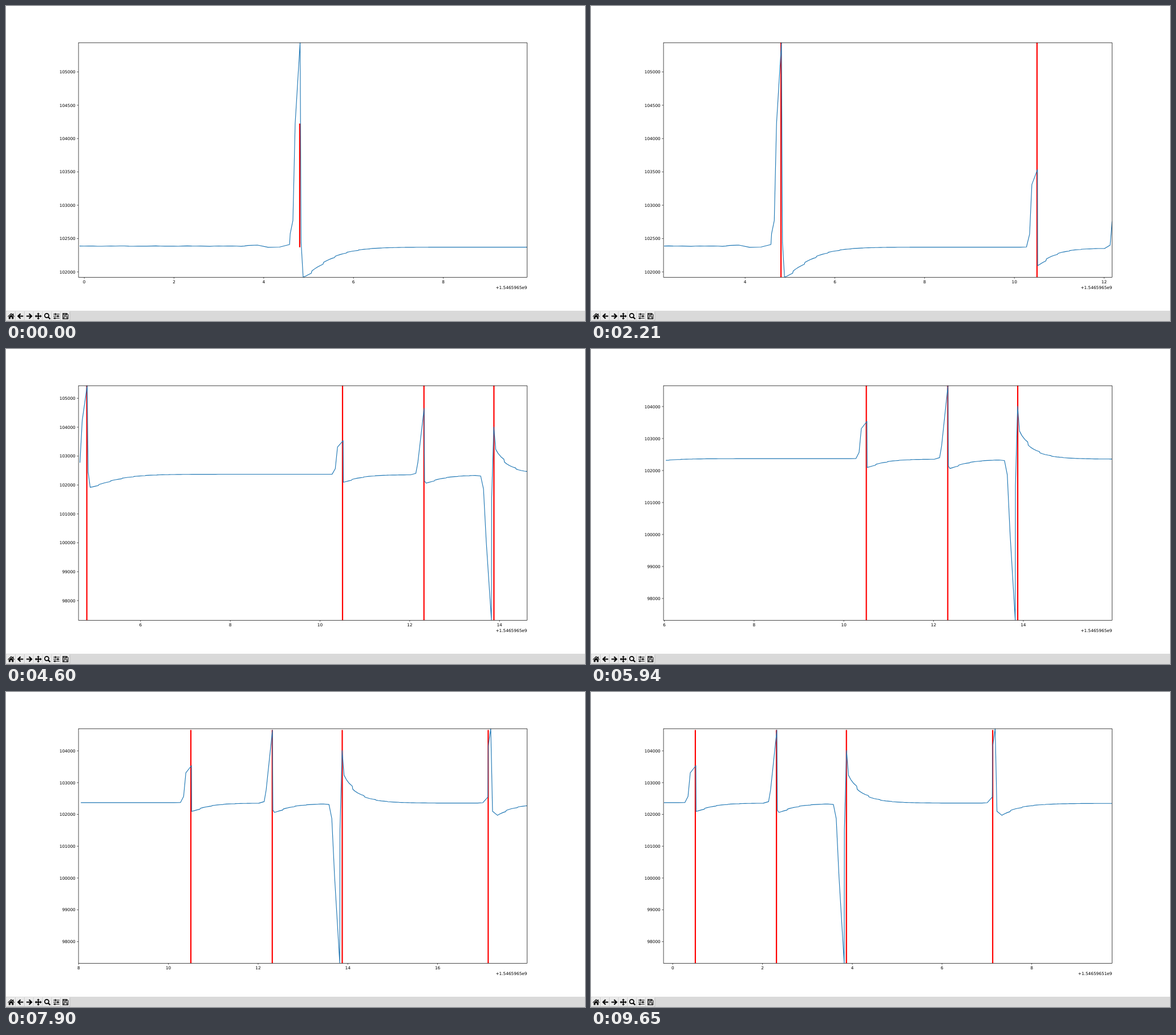
Write an HTML page that moves like this. It is 1015 px wide and 552 px high and loops after 9810 ms.

```html
<!DOCTYPE html>
<html lang="en">
<head>
<meta charset="utf-8">
<title>Pressure plot</title>
<style>
  html, body { margin: 0; width: 100%; height: 100%; overflow: hidden; background: #fff; }
  svg { display: block; width: 1015px; height: 552px; }
  text { font: 7.35px "DejaVu Sans", sans-serif; text-rendering: geometricPrecision; }
</style>
</head>
<body>
<svg viewBox="0 0 1015 552">
  <defs>
    <clipPath id="area"><rect x="126.9" y="64.1" width="786.6" height="411.2"/></clipPath>
  </defs>
  <rect width="1015" height="552" fill="#fff"/>
  <g clip-path="url(#area)" fill="none">
    <path id="marks" stroke="#f00" stroke-width="2.2"/>
    <path id="curve" stroke="#1f77b4" stroke-width="1.15" stroke-linejoin="round"/>
  </g>
  <path id="ticks" stroke="#000" stroke-width=".65"/>
  <rect x="127.1" y="64.3" width="786.5" height="411.1" fill="none" stroke="#000" stroke-width=".7"/>
  <g id="labels"></g>
  <text id="offset" x="913.5" y="495.8" text-anchor="end"></text>

  <rect y="534" width="1015" height="18" fill="#d9d9d9"/>
  <g id="buttons"></g>
  <g fill="#000">
    <path transform="translate(9 543.5)" d="M0-5.2 2.7-2.7V-4.4H4.2V-1.3L6 .4 5.3 1.2 0-3.6-5.3 1.2-6 .4ZM0-2.6 4.2 1.2V5H1.2V1.8H-1.2V5H-4.2V1.2Z"/>
    <path id="arrow" transform="translate(25 543.5)" d="M-5.4 0-.3-5.1 1.2-3.6-1.4-1.1H5.2V1.1H-1.4L1.2 3.6-.3 5.1Z"/>
    <use href="#arrow" transform="translate(66 0) scale(-1 1)"/>
    <path transform="translate(56.6 543.5)" d="M0-6 2.4-3.4H.9V-.9H3.4V-2.4L6 0 3.4 2.4V.9H.9V3.4H2.4L0 6-2.4 3.4H-.9V.9H-3.4V2.4L-6 0-3.4-2.4V-.9H-.9V-3.4H-2.4Z"/>
  </g>
  <g transform="translate(72.4 543.5)" fill="none" stroke="#000" stroke-width="1.7">
    <circle cx="-1" cy="-1" r="3.6"/>
    <path d="M1.7 1.7 5 5" stroke-width="2.2"/>
  </g>
  <g transform="translate(88.4 543.5)" stroke="#000">
    <path d="M-5.4-3.5H5.4M-5.4 0H5.4M-5.4 3.5H5.4"/>
    <path d="M-1.8-4.9V-2.1M2.6-1.4V1.4M-2.8 2.1V4.9" stroke-width="2"/>
  </g>
  <g transform="translate(104.2 543.5)" fill="none" stroke="#000" stroke-width="1.1">
    <path d="M-4.6-4.6H2.6L4.6-2.6V4.6H-4.6ZM-2.7 4.4V1H2.7V4.4M-2.7-4.4V-1.6H1.8V-4.4"/>
    <path d="M.8-4.2V-2" stroke-width="1.4"/>
  </g>
</svg>
<script>
const LOOP = 9810, SPAN = 10, END = 20;
const L = 126.9, R = 913.5, T = 64.1, B = 475.3, ZERO = 102000;
const DOT = 1015 / 1920; // one plot pixel on this stage
const $ = id => document.getElementById(id);

// Stretches of even redraws: start in ms, number of redraws.
const pace = [[0, 3], [630, 2], [1180, 8], [3240, 5], [4350, 1], [4600, 4], [5580, 1],
  [5940, 1], [6250, 3], [6950, 1], [7150, 3], [7900, 7], [9650, 1]];

// Elapsed ms against the newest sample time in seconds.
const clock = [[0, 9.869], [1180, 11.135], [3240, 13.222], [4600, 14.615],
  [6950, 17.007], [7900, 17.995], [9650, 19.791]];

// Pressure beats: marker time, key points of the spike, then a decay to base.
const beats = [
  { at: 4.802, base: 371, tau: .62, pow: 1.25, spike: [
    [3.57, 388], [3.65, 397], [3.86, 402], [4.1, 369], [4.35, 372], [4.575, 411],
    [4.59, 575], [4.65, 772], [4.7, 2225], [4.81, 3440], [4.833, 437], [4.878, -80]] },
  { at: 10.504, base: 355, tau: .38, pow: 1.1, spike: [
    [10.27, 374], [10.34, 565], [10.39, 1310], [10.515, 1535], [10.52, 94]] },
  { at: 12.314, base: 340, tau: .38, pow: 1.1, spike: [
    [12.135, 402], [12.18, 772], [12.32, 2655], [12.33, 137], [12.365, 64]] },
  { at: 13.873, base: 356, tau: .29, pow: .9, spike: [
    [13.58, 312], [13.643, -133], [13.705, -1970], [13.82, -4680], [13.825, -470],
    [13.873, 2010], [13.916, 1232]] },
  { at: 17.128, base: 348, tau: .38, pow: .95, spike: [
    [17.007, 368], [17.12, 545], [17.13, 2150], [17.185, 2700], [17.225, 100], [17.335, -28]] }
];

const lerp = (a, b, k) => a + (b - a) * k;

const steps = pace.flatMap(([from, n], i) => {
  const to = i + 1 < pace.length ? pace[i + 1][0] : LOOP;
  return Array.from({ length: n }, (_, k) => lerp(from, to, k / n));
});

// Decay after a spike; readings lag more and more until each block arrives.
function decay({ spike, base, tau, pow }, end) {
  const [x0, y0] = spike[spike.length - 1], block = .26, out = [];
  for (let k = 0; k * block < end - x0; k++) {
    for (const p of [0, .2, .45, .7, .95]) {
      const u = (k + p) * block - .065;
      if (u < .02 || x0 + u > end - .08) continue;
      const lagged = Math.max(0, u - .055 * p * p);
      out.push([x0 + u, base + (y0 - base) * Math.exp(-((lagged / tau) ** pow))]);
    }
  }
  return out;
}

const samples = [];
for (let x = -.105; x < 3.5; x += .1) samples.push([x, 387 + 3 * Math.sin(x * 13) * Math.sin(x * 5)]);
beats.forEach((b, i) => {
  const end = i + 1 < beats.length ? beats[i + 1].spike[0][0] : END;
  samples.push(...b.spike, ...decay(b, end));
});

function along(points, x) {
  let i = 1;
  while (i < points.length - 1 && points[i][0] < x) i++;
  const [a, b] = [points[i - 1], points[i]];
  return lerp(a[1], b[1], (x - a[0]) / (b[0] - a[0]));
}

const between = (from, to) => samples.filter(p => p[0] >= from && p[0] < to);

function range(points) {
  const values = points.map(p => p[1]);
  return [Math.min(...values), Math.max(...values)];
}

function tickStep(size) {
  const raw = size / 9, mag = 10 ** Math.floor(Math.log10(raw));
  return mag * [1, 2, 2.5, 5, 10].find(s => s * mag >= raw);
}

const snap = v => (Math.round(v / DOT) * DOT).toFixed(2);
const label = (x, y, anchor, s) =>
  `<text x="${x.toFixed(2)}" y="${y.toFixed(2)}" text-anchor="${anchor}">${s}</text>`;

function draw(ms) {
  const right = along(clock, ms), left = right - SPAN;
  const view = [...between(left, right), [right, along(samples, right)]];
  const [min, max] = range(view);
  const px = x => L + (x - left) / SPAN * (R - L);
  const py = v => B - (v - min) / (max - min) * (B - T);

  $("curve").setAttribute("d", "M" + view.map(p =>
    px(p[0]).toFixed(2) + " " + py(p[1]).toFixed(2)).join("L"));

  // All markers span the data range known when the latest beat was detected.
  const seen = beats.filter(b => b.at <= right);
  const last = seen[seen.length - 1].at;
  const [low, high] = range(between(last - SPAN, last));
  $("marks").setAttribute("d", seen.filter(b => b.at >= left).map(b =>
    `M${snap(px(b.at))} ${py(low).toFixed(2)}V${py(high).toFixed(2)}`).join(""));

  let ticks = "", text = "";
  const first = Math.ceil(left / 2) * 2, base = first >= 10 ? 10 : 0;
  for (let x = first; x <= right; x += 2) {
    ticks += `M${px(x).toFixed(2)} ${B}v2.6`;
    text += label(px(x), 486.2, "middle", x - base);
  }
  const step = tickStep(max - min);
  for (let v = Math.ceil((ZERO + min) / step) * step; v <= ZERO + max; v += step) {
    const y = py(v - ZERO);
    ticks += `M${L} ${y.toFixed(2)}h-2.6`;
    text += label(121.8, y + 2.7, "end", v);
  }
  $("ticks").setAttribute("d", ticks);
  $("labels").innerHTML = text;
  $("offset").textContent = base ? "+1.54659651e9" : "+1.5465965e9";
}

$("buttons").innerHTML = Array.from({ length: 7 }, (_, i) => {
  const x = 1.2 + i * 15.9;
  return `<rect x="${x}" y="535.6" width="15.2" height="15.6" fill="#e9e9e9"/>` +
    `<path d="M${x} 551V535.6h15" fill="none" stroke="#fff" stroke-width=".5"/>` +
    `<path d="M${x} 551.2h15.2V535.6" fill="none" stroke="#999" stroke-width=".5"/>`;
}).join("");

let shown = 0;
function frame(now) {
  const t = now % LOOP;
  const at = steps.filter(s => s <= t).pop();
  if (at !== shown) draw(shown = at);
  requestAnimationFrame(frame);
}
draw(shown);
requestAnimationFrame(frame);
</script>
</body>
</html>
```
